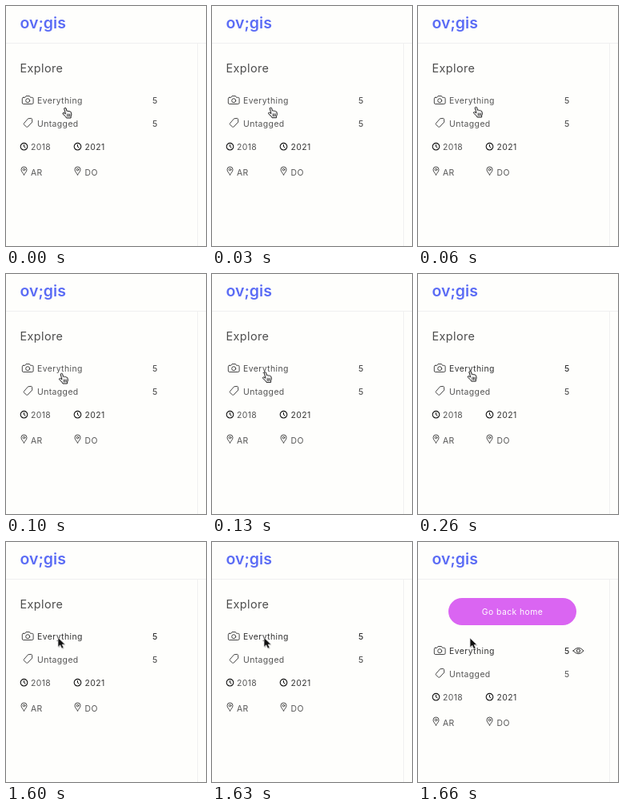
An HTML page that plays this animation: 250x300 px, repeating every 2.8 s.

```html
<!DOCTYPE html>
<html lang="en">
<head>
<meta charset="utf-8">
<style>
  html, body { margin: 0; width: 100%; height: 100%; overflow: hidden; background: #fefefc; }
  svg { display: block; font: 400 10.4px Inter, "Open Sans", sans-serif; letter-spacing: .04em; }
  .icon { fill: none; stroke: #333; stroke-linejoin: round; stroke-linecap: round; }
  text { fill: #555; }
</style>
</head>
<body>
<svg width="250" height="300" viewBox="0 0 250 300">
  <defs>
    <g id="clock" class="icon" style="stroke: #111">
      <circle r="4.3" stroke-width="1.1"/><path d="M0-2.2V.3L1.6 1.2"/>
    </g>
    <g id="pin" class="icon" stroke-width=".9">
      <path d="M0 5C-1.4 2.5-3.5.8-3.5-1.5a3.5 3.5 0 0 1 7 0C3.5.8 1.4 2.5 0 5Z"/><circle cy="-1.5" r="1.3"/>
    </g>
  </defs>

  <path d="M0 46.5H250M239.5 47V300" stroke="#f0f0f0"/>
  <text x="17.5" y="28" font-size="19.5" font-weight="600" letter-spacing="0" style="fill:#5b6cf5">ov;gis</text>

  <text id="title" x="17.5" y="83" font-size="14.4" style="fill:#4c4c4c">Explore</text>
  <g id="button">
    <rect x="38" y="70" width="160" height="34" rx="17" fill="#da65f2"/>
    <text x="118" y="90.5" text-anchor="middle" style="fill:#fff">Go back home</text>
  </g>

  <g id="list">
    <g class="icon" stroke-width=".9">
      <path d="M21.8 114.3H23.8L25 112.5H29.4L30.6 114.3H32.6a1.5 1.5 0 0 1 1.5 1.5V121a1.5 1.5 0 0 1-1.5 1.5H21.8a1.5 1.5 0 0 1-1.5-1.5V115.8a1.5 1.5 0 0 1 1.5-1.5Z"/>
      <circle cx="27.2" cy="118.2" r="2.5"/>
      <path d="M28 140.7L31.4 140.4Q32.4 140.5 32.5 141.4L32.8 145L27.2 151Q26.4 151.7 25.6 151L22.5 148.3Q21.8 147.6 22.4 146.8Z"/>
    </g>
    <text id="every" x="39" y="122">Everything</text>
    <text id="total" x="183" y="122" font-weight="500">5</text>
    <g id="eye" class="icon">
      <path d="M194 118Q200.5 110.5 207 118Q200.5 125.5 194 118Z"/>
      <circle cx="200.5" cy="118" r="2.1"/>
    </g>
    <text x="39" y="151">Untagged</text>
    <text id="rest" x="183" y="151">5</text>

    <use href="#clock" x="22.5" y="175.7"/>
    <text x="31" y="180">2018</text>
    <use href="#clock" x="89.5" y="175.7"/>
    <text x="98.5" y="180" style="fill:#333">2021</text>
    <use href="#pin" x="22.5" y="206"/>
    <text x="31" y="211.7">AR</text>
    <use href="#pin" x="89.5" y="206"/>
    <text x="98.5" y="211.7">DO</text>
  </g>

  <g id="hand" stroke="#222" stroke-linejoin="round" stroke-linecap="round">
    <path fill="#eee" d="M2.6 1.2Q3.7 0 4.8 1.2L5.6 4.6Q6.8 4 7.6 5Q8.8 4.4 9.6 5.4Q10.8 5.2 11.2 6.6L11.6 9.4L10.8 11.4V13.4H5.2L4.2 11.6L.8 8.4Q.2 7 1.8 6.8L3.8 8Z"/>
    <path fill="none" stroke-width=".8" d="M6.4 8.6V11.4M8 8.6V11.4M9.5 8.6V11.2"/>
  </g>
  <g id="arrow">
    <path d="M1 1.4V13L3.8 10.6L5.8 14.6L7.8 13.6L5.9 9.8H9.4Z" fill="#000" opacity=".2"/>
    <path d="M0 0V11.8L2.8 9.3L4.7 13.6L7 12.6L5.1 8.6H8.8Z" fill="#111" stroke="#ddd" stroke-width=".8"/>
  </g>
</svg>
<script>
const LOOP = 2800, CLICK = 1600, OPEN = 1660;
// Hand position: [start ms, x, y]
const path = [
  [0, 70.3, 126.6], [30, 69.8, 126.3], [60, 68.8, 125.6], [100, 65.8, 123.6],
  [130, 62.8, 122], [160, 62.1, 121.4], [200, 61.9, 121], [260, 61.5, 120.7]
];
const $ = id => document.getElementById(id);
const show = (id, on) => $(id).setAttribute("visibility", on ? "visible" : "hidden");
const move = (id, x, y) => $(id).setAttribute("transform", `translate(${x} ${y})`);

function draw(t) {
  const open = t >= OPEN, clicked = t >= CLICK;
  const [, x, y] = path.findLast(p => t >= p[0]);
  move("hand", x, y);
  move("arrow", 65, open ? 120 : 119.5);
  move("list", 0, open ? 18 : 0);
  show("hand", !clicked);
  show("arrow", clicked);
  show("title", !open);
  show("button", open);
  show("eye", open);

  const shade = 85 - 35 * Math.min(1, Math.max(0, (t - 100) / 160));
  $("every").style.fill = $("total").style.fill = `rgb(${shade},${shade},${shade})`;
  $("rest").setAttribute("font-weight", open ? 400 : 500);
}

let start;
function tick(now) {
  start ??= now;
  draw((now - start) % LOOP);
  requestAnimationFrame(tick);
}
draw(0);
requestAnimationFrame(tick);
</script>
</body>
</html>
```
